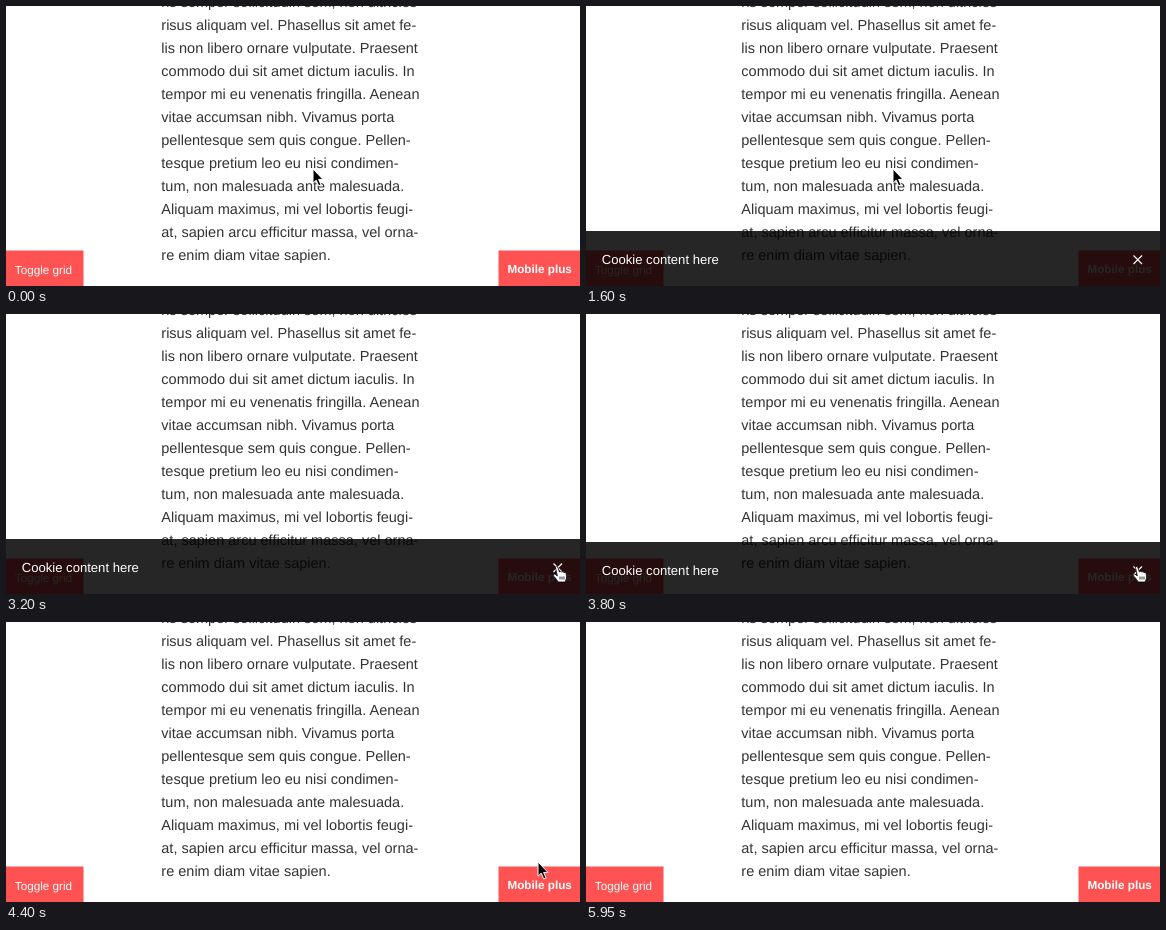
An HTML page that plays this animation: 574 by 280 pixels, repeating every 6.85 s.

```html
<!DOCTYPE html>
<html lang="en">
<head>
<meta charset="utf-8">
<title>Cookie bar</title>
<style>
  html, body { margin: 0; width: 100%; height: 100%; overflow: hidden; background: #fff; }
  svg {
    display: block; width: 574px; height: 280px;
    font-family: "Liberation Sans", Arial, sans-serif; text-rendering: geometricPrecision;
  }
  #copy { font-size: 14.53px; fill: #333; }
  .button { font-size: 11.7px; fill: #fff; }
  .button rect { fill: #ff5252; }
</style>
</head>
<body>
<svg viewBox="0 0 574 280">
  <g id="copy"></g>
  <g class="button">
    <rect y="244.5" width="77.5" height="36"/>
    <text x="8.8" y="268">Toggle grid</text>
  </g>
  <g class="button" font-weight="bold">
    <rect x="492.5" y="244.5" width="82" height="36"/>
    <text x="501.5" y="267">Mobile plus</text>
  </g>
  <g id="bar">
    <rect y="225" width="574" height="55" fill="#000" fill-opacity=".85"/>
    <text x="15.7" y="258" font-size="13.1" fill="#fff">Cookie content here</text>
    <path d="M547.5 249.5l8.5 8.5m0-8.5l-8.5 8.5" stroke="#fff" stroke-width="1.2"/>
  </g>
  <g id="cursor" stroke-linejoin="round">
    <path id="arrow" d="M0 0V14.2L3.2 11.2L5.7 16.8L8 15.8L5.6 10.4H10Z" stroke="#fff"/>
    <g id="hand" fill="#fff" stroke="#000" stroke-width=".8">
      <path d="M-1.5 .5Q-.5-1.5 1 .5L2.4 5Q3.5 3.6 4.8 5Q6 4 7 5.5Q8.6 4.8 9.2 6.8Q10.5 11 8.2 15H1.2Q-.5 12-3 9.5Q-4.5 7.2-2.5 7Q-1 7.4 .3 9Z"/>
      <path d="M3 9.5v3M5 9.5v3M7 9.5v3"/>
    </g>
  </g>
</svg>
<script>
const LOOP = 6850, STEP = 50, BAR_HEIGHT = 55, SLIDE = 400;
const $ = id => document.getElementById(id);

const lines = `ris semper sollicitudin sem, non ultricies
risus aliquam vel. Phasellus sit amet fe-
lis non libero ornare vulputate. Praesent
commodo dui sit amet dictum iaculis. In
tempor mi eu venenatis fringilla. Aenean
vitae accumsan nibh. Vivamus porta
pellentesque sem quis congue. Pellen-
tesque pretium leo eu nisi condimen-
tum, non malesuada ante malesuada.
Aliquam maximus, mi vel lobortis feugi-
at, sapien arcu efficitur massa, vel orna-
re enim diam vitae sapien.`.split("\n");
$("copy").innerHTML = lines.map((line, i) => `<text x="155.3" y="${1 + 23 * i}">${line}</text>`).join("");

const progress = (t, start, length) => Math.min(1, Math.max(0, (t - start) / length));
const smooth = p => p * p * (3 - 2 * p);

// CSS "ease": cubic-bezier(.25, .1, .25, 1)
function ease(x) {
  const bezier = (u, a, b) => 3 * u * (1 - u) * ((1 - u) * a + u * b) + u ** 3;
  let low = 0, high = 1;
  for (let i = 0; i < 20; i++) {
    const mid = (low + high) / 2;
    if (bezier(mid, .25, .25) < x) low = mid; else high = mid;
  }
  return bezier(high, .1, 1);
}

// Cursor stops: time, x, y
const stops = [
  [0, 307, 163], [1700, 307, 163], [2300, 547, 243], [2400, 547, 243],
  [2550, 551, 253], [4350, 551, 253], [4400, 532, 240], [5000, 470, 191], [LOOP, 470, 191]
];

function cursorAt(t) {
  const i = stops.findIndex(stop => stop[0] > t);
  const [t0, x0, y0] = stops[i - 1], [t1, x1, y1] = stops[i];
  const p = progress(t, t0, t1 - t0);
  const k = t >= 4400 ? 1 - (1 - p) ** 2 : smooth(p);
  return [x0 + (x1 - x0) * k, y0 + (y1 - y0) * k];
}

function draw(now) {
  const t = Math.floor(now % LOOP / STEP) * STEP;
  const shown = ease(progress(t, 1122, SLIDE)) - ease(progress(t, 3772, SLIDE));
  $("bar").setAttribute("transform", `translate(0 ${Math.round(BAR_HEIGHT * (1 - shown))})`);

  const pointing = t >= 2500 && t < 4400;
  $("cursor").setAttribute("transform", `translate(${cursorAt(t).map(Math.round)})`);
  $("cursor").style.display = t < 5900 ? "" : "none";
  $("arrow").style.display = pointing ? "none" : "";
  $("hand").style.display = pointing ? "" : "none";
}

const start = performance.now();
function tick() {
  draw(performance.now() - start);
  requestAnimationFrame(tick);
}
tick();
</script>
</body>
</html>
```
